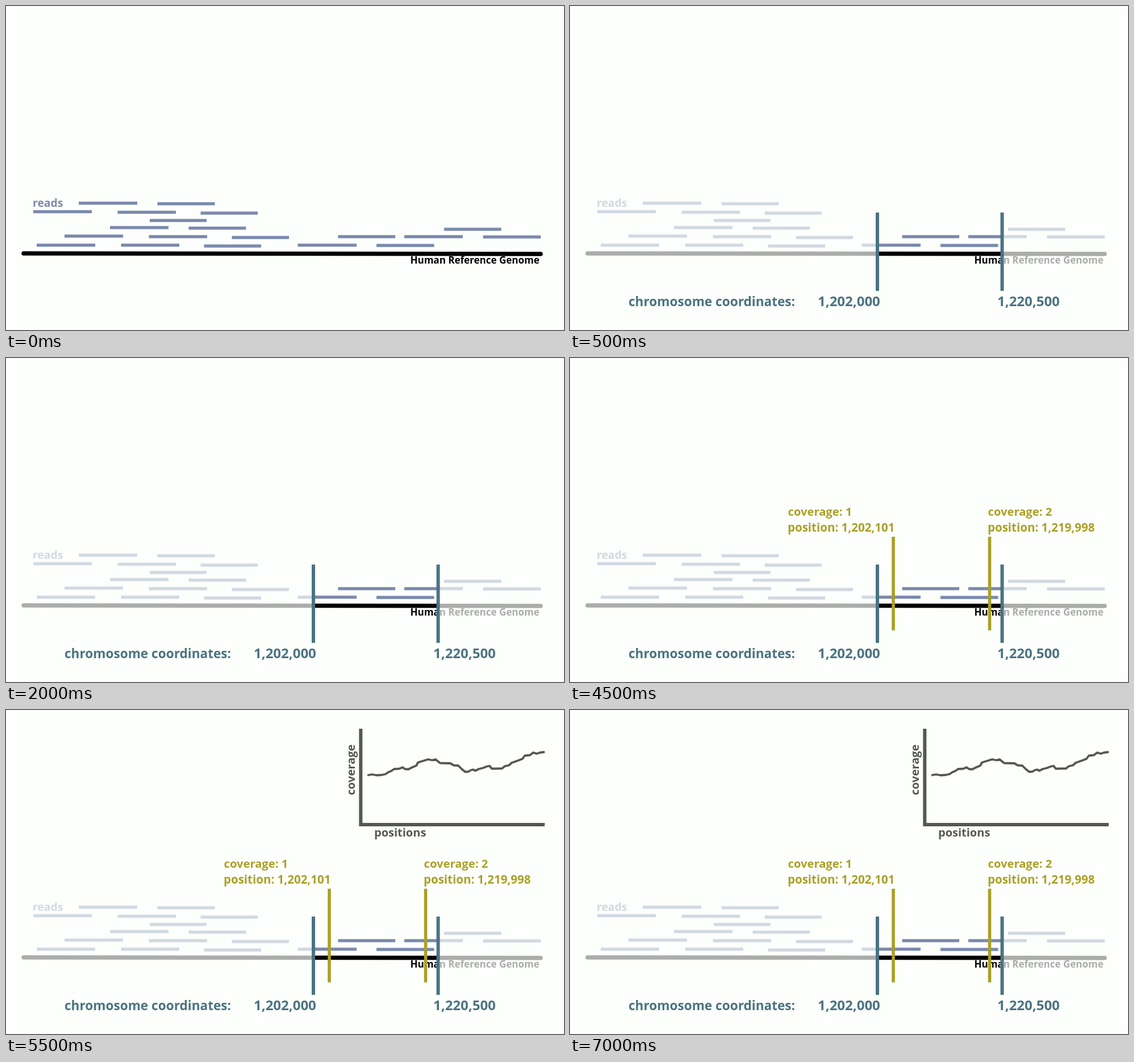
These frames come from a looping animation (982x571 px, 8000 ms). An HTML page:

```html
<!DOCTYPE html>
<html lang="en">
<head>
<meta charset="utf-8">
<title>Read coverage</title>
<style>
  html, body { margin: 0; width: 100%; height: 100%; overflow: hidden; background: #fdfffc; }
  svg { display: block; width: 982px; height: 571px; }
  text { font-family: "Open Sans", "Noto Sans", sans-serif; font-weight: 700; }
  path, polyline { fill: none; }
  [data-from] { visibility: hidden; }
</style>
</head>
<body>
<svg viewBox="0 0 982 571">
  <g fill="#7b8aad" stroke="#7b8aad">
    <text x="47" y="354" font-size="19.4" stroke="none">reads</text>
    <path stroke-width="5.4" d="M128 347.5h103M266.5 348.5h101M48 362.5h103M196.5 363.5h102.5
      M342.5 365h100.5M253 378h100M183 390.5h103M321.5 391.5h101M103 405.5h103M251.5 406.5h102.5
      M397.5 408h100.5M54 421.5h103M202.5 421.5h102.5M348.5 423h100.5M513.5 421.5h103.5
      M584.5 406.5h100.5M652 422h101.5M701 406.5h103M771 393.5h100.5M839.5 407h101.5"/>
  </g>
  <path d="M31 436L941 437" stroke="#000" stroke-width="7.4" stroke-linecap="round"/>
  <text x="711.5" y="454" font-size="17">Human Reference Genome</text>

  <g data-from="500" fill="#4a7381">
    <path d="M0 330H541V460H0ZM761 330H982V460H761Z" style="fill:#fdfffc" opacity=".68"/>
    <path d="M541 364V502M760.5 364V502" stroke="#4a7381" stroke-width="6"/>
    <text x="103" y="529" font-size="22.6">chromosome coordinates:</text>
    <g font-size="24">
      <text x="436" y="529">1,202,000</text>
      <text x="752" y="529">1,220,500</text>
    </g>
  </g>

  <g data-from="3000" fill="#aaa028" font-size="20.5">
    <path d="M569 315V480M738.5 315V480" stroke="#aaa028" stroke-width="5.6"/>
    <text x="383.5" y="278" font-size="20.2">coverage: 1</text>
    <text x="383" y="306">position: 1,202,101</text>
    <text x="735.5" y="278" font-size="20.2">coverage: 2</text>
    <text x="735" y="306">position: 1,219,998</text>
  </g>

  <g data-from="5500" fill="#555753" stroke="#555753" font-size="20">
    <path d="M624.3 33V202H948" stroke-width="6"/>
    <polyline stroke-width="3.8" stroke-linejoin="round" points="636,115 644,113.5 652,115 661,114.5 668,113
      673,109.5 678,107.5 683,104 692,103.5 698,101 702,104 708,104.5 715,101 722,98 725,92.5 733,90
      743,87 750,88.5 756,87 764,93.5 782,94 788,97.5 796,98 802,104 808,109 814,108.5 818,106 822,105
      826,107 832,104 840,102 846,99.5 851,98.5 855,103.5 873,103 878,99 885,97.5 890,93 900,89.5
      909,86 913,80.5 922,79.5 928,75 934,77 940,75 948,74"/>
    <g stroke="none">
      <text x="648" y="223">positions</text>
      <text transform="translate(614 150) rotate(-90)">coverage</text>
    </g>
  </g>
</svg>
<script>
  const LOOP = 8000;
  const layers = document.querySelectorAll("[data-from]");

  function draw() {
    const time = performance.now() % LOOP;
    for (const layer of layers) {
      layer.style.visibility = time >= layer.dataset.from ? "visible" : "hidden";
    }
    requestAnimationFrame(draw);
  }
  draw();
</script>
</body>
</html>
```
